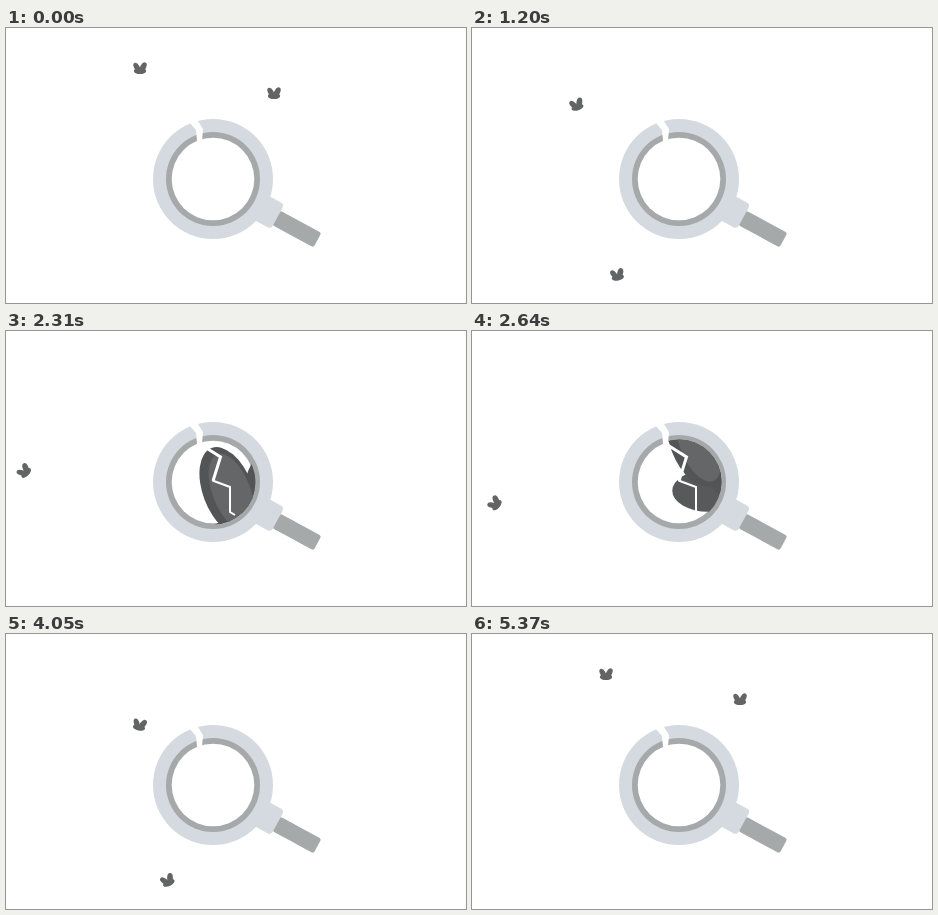
Write an HTML page that moves like this. It is 460 by 275 pixels and loops after 5.4 s.

```html
<!DOCTYPE html>
<html lang="en">
<head>
<meta charset="utf-8">
<title>Bugs around a magnifier</title>
<style>
  html, body { margin: 0; width: 100%; height: 100%; overflow: hidden; background: #fff; }
  svg { display: block; width: 460px; height: 275px; }
</style>
</head>
<body>
<svg viewBox="0 0 460 275" xmlns="http://www.w3.org/2000/svg">
  <defs>
    <clipPath id="lens"><circle cx="207" cy="151" r="42.5"/></clipPath>
    <g id="fly" fill="#636465">
      <ellipse cy="3" rx="6.2" ry="3.1"/>
      <ellipse cx="-3.2" cy="-0.8" rx="2.7" ry="4.8" transform="rotate(-30 -3.2 -0.8)"/>
      <ellipse cx="3.2" cy="-1" rx="2.9" ry="5" transform="rotate(26 3.2 -1)"/>
    </g>
  </defs>

  <use id="first" href="#fly"/>
  <use id="second" href="#fly"/>

  <g id="magnifier">
    <rect x="-23" y="-8" width="47" height="16.5" rx="2.5" fill="#a6a9aa" transform="translate(290.5 200.5) rotate(28.5)"/>
    <rect x="-11" y="-14" width="22" height="28" rx="4" fill="#d5d9e0" transform="translate(262 183.5) rotate(28.5)"/>
    <circle cx="207" cy="151" r="60" fill="#d5d9e0"/>
    <circle cx="207" cy="151" r="47" fill="#a6a9aa"/>
    <circle cx="207" cy="151" r="41.3" fill="#fff"/>
  </g>

  <g clip-path="url(#lens)">
    <g id="enlarged">
      <ellipse rx="36" ry="21" fill="#58595a"/>
      <ellipse cx="19" cy="-42" rx="18" ry="46" fill="#535455" transform="rotate(8 19 -42)"/>
      <g transform="translate(-13 -48) rotate(-21)">
        <ellipse rx="25" ry="46" fill="#535455"/>
        <ellipse cx="3" cy="2" rx="19" ry="40" fill="#656667"/>
      </g>
    </g>
    <g fill="none" stroke="#fff">
      <path d="M194 113 L214.5 126 L207 150" stroke-width="3"/>
      <path d="M206.5 149.5 L224 156 L224 181 L229 184" stroke-width="2"/>
    </g>
  </g>
  <path d="M183 94 L190 90 L197 101 L196 113 L191 113 L190 102Z" fill="#fff"/>
</svg>
<script>
const LOOP = 5400, START = 150, END = 5370, STEP = 30;

// Waypoints, passed at equal intervals
const firstRoute = [
  [134, 40], [97, 33], [102, 64], [99, 93], [31, 116], [18, 141], [27, 184],
  [53, 219], [98, 234], [164, 246], [240, 215], [288, 137], [292, 72]
];
const secondRoute = [
  [268, 65], [287, 135], [176, 238], [126, 236], [190, 195], [205, 165], [220, 145],
  [242, 100], [180, 71], [132, 91], [85, 94], [37, 68], [86, 28]
];

// Catmull-Rom curve, progress 0..1
function along(route, progress) {
  const last = route.length - 1;
  const i = Math.min(Math.floor(progress * last), last - 1);
  const u = progress * last - i;
  const at = n => route[Math.max(0, Math.min(last, n))];
  const [p, a, b, q] = [-1, 0, 1, 2].map(n => at(i + n));
  return [0, 1].map(c =>
    a[c] + (b[c] - a[c]) * u * u * (3 - 2 * u)
    + (b[c] - p[c]) / 2 * u * (1 - u) ** 2
    - (q[c] - a[c]) / 2 * u * u * (1 - u));
}

function place(id, [x, y], angle = 0) {
  document.getElementById(id).setAttribute('transform', `translate(${x} ${y}) rotate(${angle})`);
}

function render(time) {
  let t = Math.floor((time % LOOP) / STEP) * STEP;
  if (t < START || t >= END) t = START;
  const progress = (t - START) / (END - START), turn = 2 * Math.PI * progress;
  place('first', along(firstRoute, progress), -25 * (1 - Math.cos(turn)));
  place('second', along(secondRoute, progress), -12 * Math.sin(turn));

  // The enlarged bug drifts steadily up through the lens
  const drift = (t - 2310) / 780;
  place('enlarged', [235 + 3 * drift, 208 - 114 * drift]);
}

const began = performance.now();
function tick() {
  render(performance.now() - began);
  requestAnimationFrame(tick);
}
tick();
</script>
</body>
</html>
```
